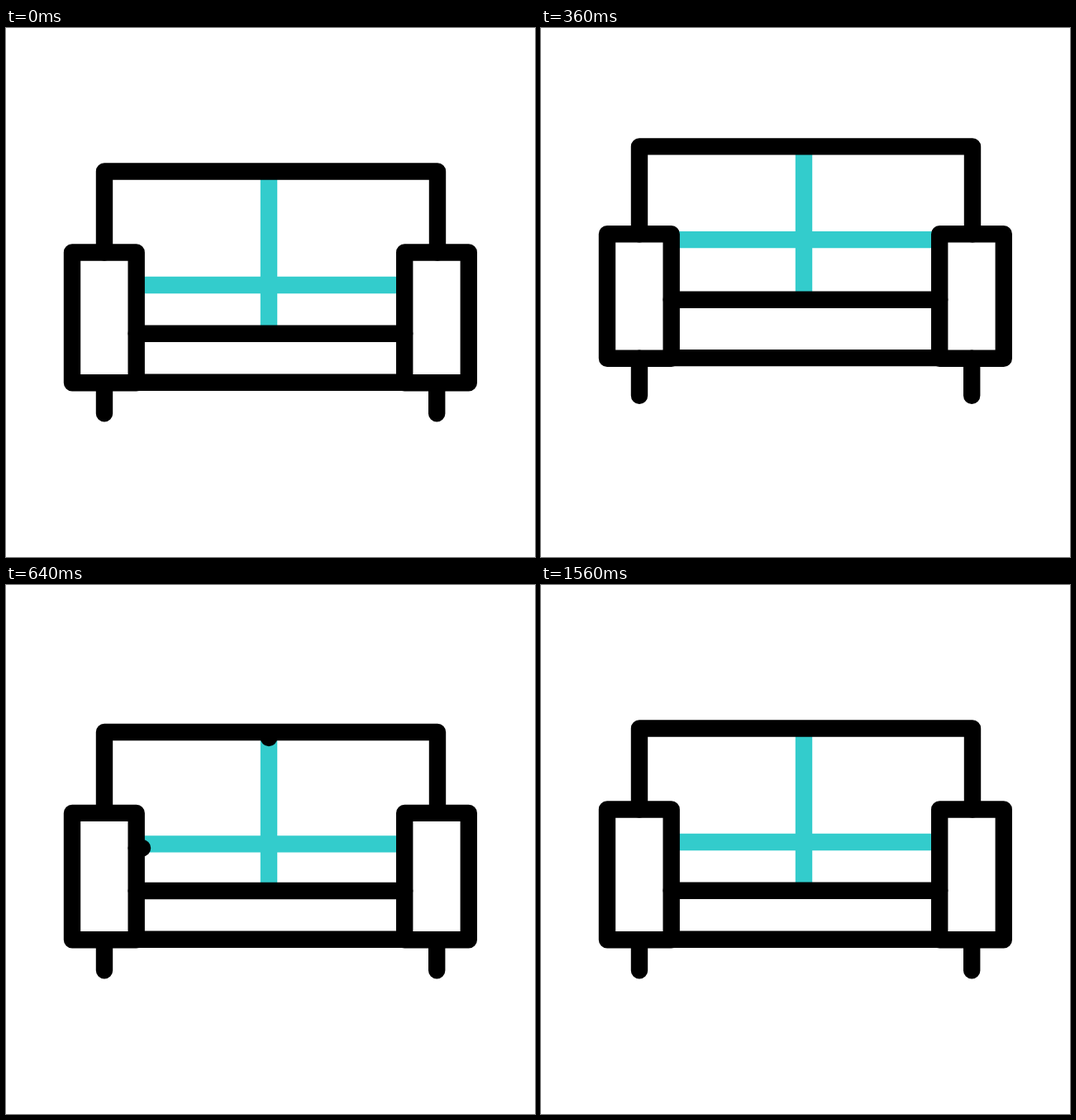
Recreate the animation shown at these times as an HTML page. Size 640 by 640 pixels, loop 2000 ms.

```html
<!DOCTYPE html>
<html lang="en">
<head>
<meta charset="utf-8">
<title>Sofa</title>
<style>
  html, body { margin: 0; width: 100%; height: 100%; overflow: hidden; background: #fff; }
  svg { display: block; width: 100%; height: 100%; }
  path { fill: none; stroke: #000; stroke-width: 20.4; stroke-linecap: round; stroke-linejoin: round; }
  .seam { stroke: #3cc; stroke-linecap: butt; }
</style>
</head>
<body>
<svg viewBox="0 0 640 640">
  <path id="seams" class="seam"/>
  <path id="ink"/>
  <path id="frame"/>
  <path id="arms"/>
  <path id="legs"/>
</svg>
<script>
const LOOP = 2000, STEP = 40;
const LEFT = 157.7, RIGHT = 482.2, MID = 318;

const smooth = (t, from, to) => {
  const u = Math.min(1, Math.max(0, (t - from) / (to - from)));
  return u * u * (3 - 2 * u);
};

// Rise to `up`, drop to `down`, settle at rest.
const bounce = (t, rest, up, down) =>
  rest + up * smooth(t, 120, 320)
       + (down - up) * smooth(t, 320, 520)
       - down * smooth(t, 520, 680);

const set = (id, d) => document.getElementById(id).setAttribute('d', d);
const mix = (a, b, k) => a + (b - a) * k;

function draw(t) {
  const back = bounce(t, 173.5, -37, 29);
  const armTop = bounce(t, 271.5, -28, 28);
  const armEnd = bounce(t, 429.3, -33, 0);
  const base = bounce(t, 428.7, -33, 0);
  const cushion = bounce(t, 311, -63, 15);
  const seat = bounce(t, 369.8, -46, 1.5);
  const foot = bounce(t, 466.4, -24, -1);

  set('seams', `M${MID} ${back}V${seat}M${LEFT} ${cushion}H${RIGHT}`);
  set('frame', `M119 ${armTop}V${back}H522V${armTop}` +
    `M${LEFT} ${seat}H${RIGHT}M${LEFT} ${base}H${RIGHT}`);
  const arm = (a, b) => `M${a} ${armTop}H${b}V${armEnd}H${a}Z`;
  set('arms', arm(80, LEFT) + arm(RIGHT, 559.8));
  set('legs', `M119 ${armEnd}V${foot}M521.2 ${armEnd}V${foot}`);

  // Black strokes run along the seams, then wipe off behind themselves.
  const head = smooth(t, 585, 1199), tail = smooth(t, 935, 1549);
  const drop = 46 * (1 - smooth(t, 520, 680));
  const x = k => mix(LEFT, RIGHT, k);
  const y = k => mix(173.3, 369.8, k) + drop;
  set('ink', head > tail
    ? `M${MID} ${y(tail)}V${y(head)}M${x(tail)} ${311 + drop}H${x(head)}`
    : '');
}

const start = performance.now();
function tick() {
  const t = (performance.now() - start) % LOOP;
  draw(Math.floor(t / STEP) * STEP);
  requestAnimationFrame(tick);
}
tick();
</script>
</body>
</html>
```
